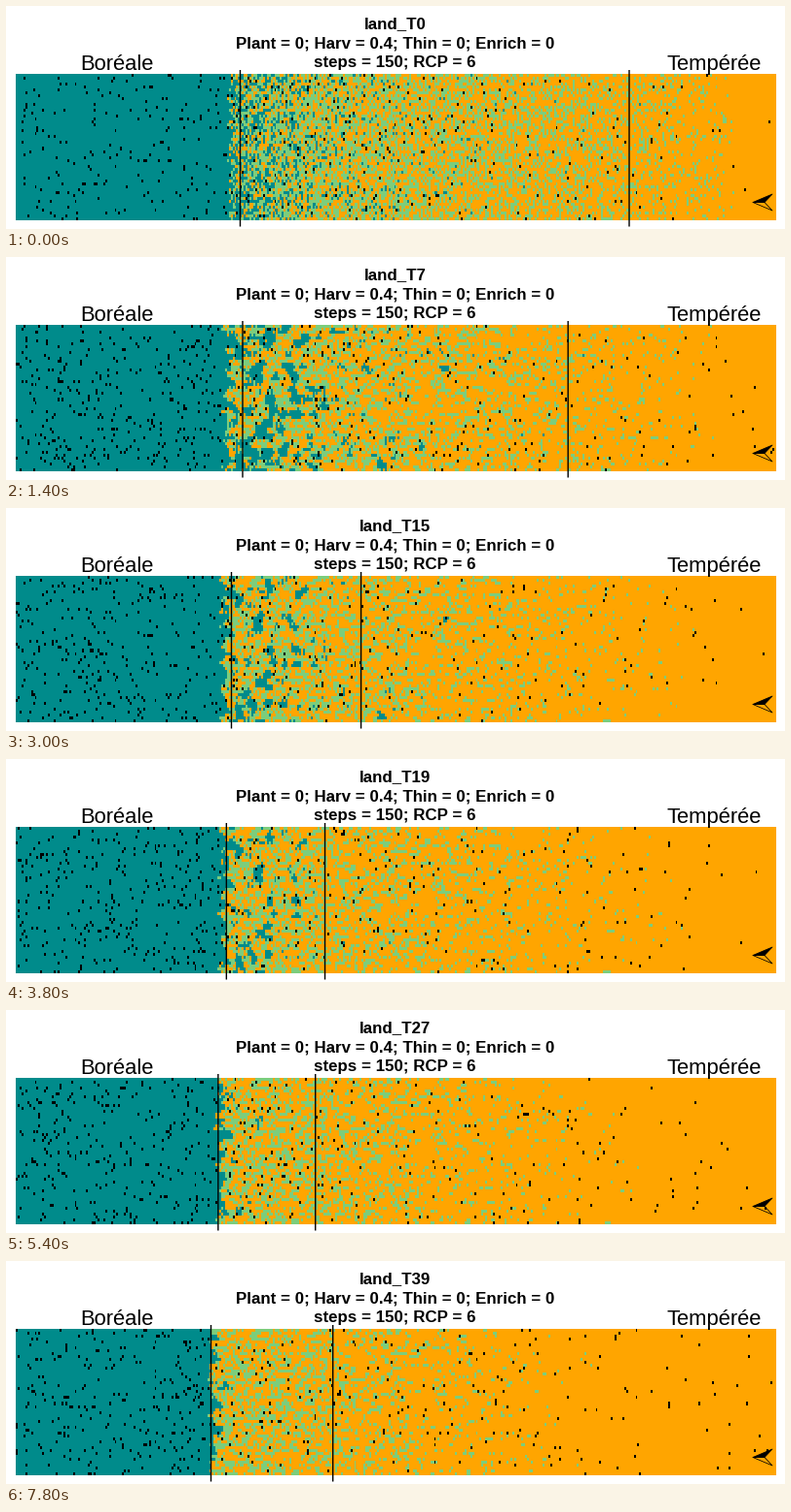
A matplotlib script for the animation above (8 s loop, 800 by 230 pixels).

```python
import numpy as np
import matplotlib.pyplot as plt
from matplotlib.animation import FuncAnimation

W, H, DPI = 800, 230, 80
COLS, ROWS = 400, 50
LEFT, RIGHT, TOP, BOTTOM = 10, 791, 70, 221
STEPS, INTERVAL = 40, 200

BOREAL, MIXED, TEMPERATE, BARE = range(4)
PALETTE = np.array([[0, 139, 139], [124, 205, 124], [255, 165, 0], [0, 0, 0]],
                   dtype=np.uint8)

# Landscape parameters at a few time steps, linear in between
KEYS = [0, 7, 11, 15, 23, 31, 39]
TRACKS = {
    "line_a": [240.5, 243, 234.3, 231.5, 221.2, 214.5, 210.5],
    "line_b": [640, 577.2, 484.6, 364.6, 290.5, 345, 335.7],
    "edge": [229, 224, 222, 221, 218, 214.5, 210.5],
    "boreal": [0.62, 0.75, 0.6, 0.6, 0.8, 0.8, 0.6],
    "reach": [65, 58, 48, 38, 14, 6, 5],
    "mixed": [0.6, 0.52, 0.5, 0.48, 0.46, 0.46, 0.46],
    "limit": [750, 732, 725, 720, 690, 640, 620],
    "curve": [0.6, 1.0, 1.15, 1.3, 1.5, 1.5, 1.5],
    "bare_a": [0.037, 0.06, 0.055, 0.052, 0.054, 0.054, 0.055],
    "bare_b": [0.03, 0.025, 0.022, 0.02, 0.02, 0.02, 0.02],
}


def at(name, t):
    return np.interp(t, KEYS, TRACKS[name])


def ranked(field):
    """Spread a field evenly over 0..1, keeping its order."""
    return field.ravel().argsort().argsort().reshape(field.shape) / field.size


def smooth(field, ry, rx):
    shifts = [(dy, dx) for dy in range(-ry, ry + 1) for dx in range(-rx, rx + 1)]
    return sum(np.roll(field, s, (0, 1)) for s in shifts) / len(shifts)


rng = np.random.default_rng(12)
x = LEFT + (np.arange(COLS) + 0.5) * (RIGHT - LEFT) / COLS
noise_a, noise_b = rng.standard_normal((2, ROWS, COLS))
clump_a = smooth(noise_a, 1, 2) * 3.9
clump_b = smooth(noise_b, 0, 1) * 1.7
jitter = rng.uniform(-3, 3, (ROWS, 1))


def landscape(t):
    mix = min(t / 7, 1)
    rank_a = ranked(noise_a * (1 - 0.75 * mix) + clump_a * 0.75 * mix)
    rank_b = ranked(noise_b * (1 - 0.4 * mix) + clump_b * 0.4 * mix)

    past = x - at("edge", t) - jitter
    p_boreal = at("boreal", t) * np.exp(-np.maximum(past, 0) / at("reach", t))
    limit = at("limit", t)
    share = np.clip((limit - x) / (limit - 230), 0, 1)
    p_mixed = at("mixed", t) * share ** at("curve", t)

    cells = np.where(rank_b < p_mixed, MIXED, TEMPERATE)
    cells[(past < 0) | (rank_a < p_boreal)] = BOREAL

    fade = np.clip((RIGHT - x) / (RIGHT - 230), 0, 1)
    p_bare = np.where(past < 0, at("bare_a", t), 0.003 + at("bare_b", t) * fade)
    cells[np.random.default_rng(500 + t).random(cells.shape) < p_bare] = BARE
    return PALETTE[cells]


def label(cx, y, text, px, weight="normal"):
    return ax.text(cx, y, text, fontsize=px * 72 / DPI, weight=weight,
                   family="Liberation Sans", ha="center", va="baseline")


fig = plt.figure(figsize=(W / DPI, H / DPI), dpi=DPI, facecolor="white")
ax = fig.add_axes([0, 0, 1, 1])
image = ax.imshow(landscape(0), extent=(LEFT, RIGHT, BOTTOM, TOP),
                  aspect="auto", interpolation="nearest")
ax.set_xlim(0, W)
ax.set_ylim(H, 0)
ax.axis("off")

title = label(400, 23, "land_T0", 16.9, "bold")
label(400, 43, "Plant = 0; Harv = 0.4; Thin = 0; Enrich = 0", 16.9, "bold")
label(399.7, 63, "steps = 150; RCP = 6", 16.9, "bold")
label(114, 66, "Boréale", 22)
label(727, 66, "Tempérée", 22)

borders = [ax.plot([0, 0], [66, 227.5], color="black", lw=1.4 * 72 / DPI,
                   solid_capstyle="butt", snap=False)[0] for _ in range(2)]

# North arrow, turned to the left
tip, notch = (767, 202.5), (779, 202.5)
for corner, fill in [((787, 194), "black"), ((787, 211), "none")]:
    ax.fill(*zip(tip, corner, notch), facecolor=fill, edgecolor="black",
            lw=0.7, joinstyle="round")


def draw(t):
    image.set_data(landscape(t))
    title.set_text(f"land_T{t}")
    for border, name in zip(borders, ("line_a", "line_b")):
        border.set_xdata([at(name, t)] * 2)
    return [image, title, *borders]


anim = FuncAnimation(fig, draw, frames=STEPS, interval=INTERVAL,
                     init_func=lambda: draw(0), repeat=True, repeat_delay=0)
plt.show()
```
